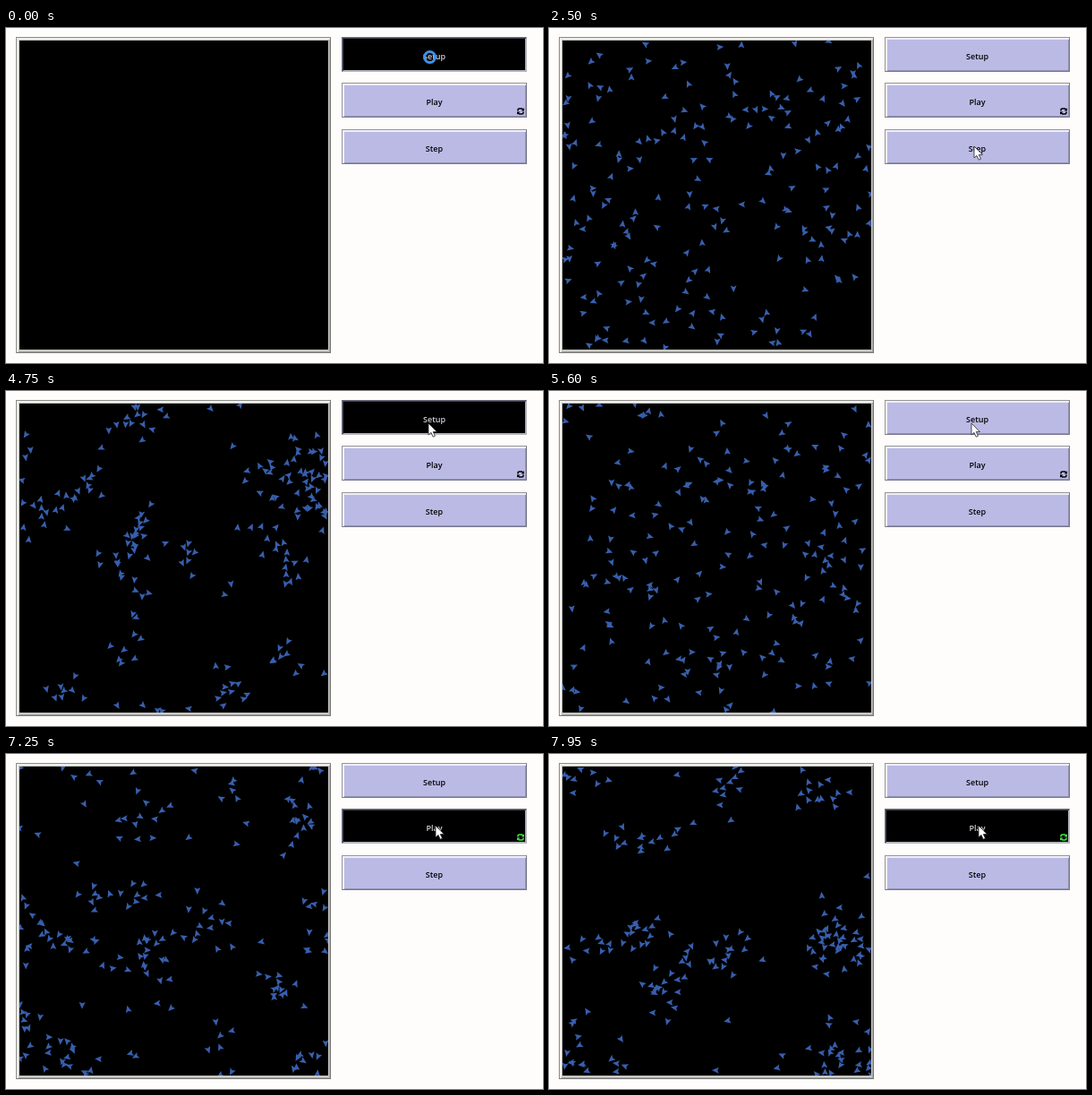
These frames come from a looping animation (600 px wide and 374 px high, 8 s). An HTML page with a canvas:

```html
<!DOCTYPE html>
<html lang="en">
<head>
<meta charset="utf-8">
<title>Flocking</title>
<style>
html, body { margin: 0; width: 100%; height: 100%; overflow: hidden; background: #fefdfc; }
body { position: relative; }
#frame, button, #cursor, #busy { position: absolute; box-sizing: border-box; }
#frame {
  left: 11px; top: 10px; width: 352px; height: 353px; background: #c9c9c5;
  border: 1px solid; border-color: #8c8c8a #777 #777 #8c8c8a;
  box-shadow: inset 2px 2px #eeeeea, inset -1px -1px #a5a5a2;
}
canvas { position: absolute; left: 3px; top: 3px; background: #000; }
button {
  left: 375px; width: 207px; height: 39px; padding: 3px 0 0; border-radius: 0;
  font: 600 9px/1 "Open Sans", "Noto Sans", sans-serif; color: #000;
  background: #bbbae5; border: 1px solid; border-color: #969696 #77778a #77778a #969696;
  box-shadow: inset 2px 2px #eeeef8, inset -1px -1px #9292b4;
}
button.down {
  background: #000; color: #d2d2dc; border-color: #6c6c80 #b4b4bc #b4b4bc #6c6c80;
  box-shadow: inset 1px 1px #444450, inset -1px -1px #b4b4bc;
}
#setup { top: 10px; }
#play { top: 61px; --icon: #000; }
#step { top: 113px; }
#play.down { --icon: #45e64c; }
#play svg { position: absolute; right: 2px; bottom: 2px; fill: none; stroke: var(--icon); stroke-width: 1.6; }
#play .tips { fill: var(--icon); stroke: none; }
#cursor { left: 0; top: 0; overflow: visible; }
#busy { left: 466px; top: 25px; width: 15px; height: 15px; border: 3px solid #3d91e6; border-radius: 50%; }
</style>
</head>
<body>
<div id="frame"><canvas id="board" width="345" height="345"></canvas></div>
<button id="setup">Setup</button>
<button id="play">Play
  <svg width="8" height="8" viewBox="0 0 8 8">
    <path d="M1 3.5V2.5Q1 1 2.5 1H5.5L7 2.5M7 4.5V5.5Q7 7 5.5 7H2.5L1 5.5"/>
    <path class="tips" d="M4.5 3.6H8V.2ZM3.5 4.4H0V7.8Z"/>
  </svg>
</button>
<button id="step">Step</button>
<div id="busy"></div>
<svg id="cursor" width="10" height="16"><path d="M0 0V13L3 10.4 5.2 15.2 7.5 14.2 5.3 9.6H9.4Z" fill="#fff" stroke="#222" stroke-width=".8"/></svg>
<script>
const LOOP = 8000, FRAME = 50, COUNT = 196, SIZE = 345, SPEED = 5;
const VISION = 34, GAP = 8, ALIGN_TURN = 0.2, COHERE_TURN = 0.28, AVOID_TURN = 0.25;
const el = id => document.getElementById(id);
const ctx = el("board").getContext("2d");
const wrap = v => ((v % SIZE) + SIZE) % SIZE;
const shortest = d => wrap(d + SIZE / 2) - SIZE / 2;
const clamp = (v, lo, hi) => Math.min(hi, Math.max(lo, v));

function randomizer(seed) {
  return () => {
    seed = (seed + 0x6D2B79F5) | 0;
    let r = Math.imul(seed ^ (seed >>> 15), 1 | seed);
    r = (r + Math.imul(r ^ (r >>> 7), 61 | r)) ^ r;
    return ((r ^ (r >>> 14)) >>> 0) / 4294967296;
  };
}

function scatter(seed) {
  const rnd = randomizer(seed);
  return Array.from({ length: COUNT }, () =>
    ({ x: rnd() * SIZE, y: rnd() * SIZE, heading: rnd() * 2 * Math.PI }));
}

const advance = ({ x, y, heading }, distance) => ({
  x: wrap(x + Math.sin(heading) * distance),
  y: wrap(y - Math.cos(heading) * distance),
  heading
});

// Angle from one heading to the direction (dx, dy), limited to a maximum turn
function turnTowards(heading, dx, dy, limit) {
  const diff = Math.atan2(dx, -dy) - heading;
  return clamp(Math.atan2(Math.sin(diff), Math.cos(diff)), -limit, limit);
}

// Each bird avoids a close neighbour, otherwise aligns with and approaches its flock
function flockTick(birds, course) {
  return birds.map(bird => {
    let { heading } = bird;
    let nearest = null, nearestDistance = VISION;
    let centreX = 0, centreY = 0, alignX = Math.sin(course), alignY = -Math.cos(course);
    for (const other of birds) {
      if (other === bird) continue;
      const dx = shortest(other.x - bird.x), dy = shortest(other.y - bird.y);
      const distance = Math.hypot(dx, dy);
      if (distance > VISION) continue;
      centreX += dx;
      centreY += dy;
      alignX += Math.sin(other.heading);
      alignY -= Math.cos(other.heading);
      if (distance < nearestDistance) {
        nearest = { dx, dy };
        nearestDistance = distance;
      }
    }
    if (nearestDistance < GAP) {
      heading += turnTowards(heading, -nearest.dx, -nearest.dy, AVOID_TURN);
    } else {
      heading += turnTowards(heading, alignX, alignY, ALIGN_TURN);
      if (nearest) heading += turnTowards(heading, centreX, centreY, COHERE_TURN);
    }
    return advance({ ...bird, heading }, SPEED);
  });
}

function makeScene(start, seed, ticks = 0, course = 0, tickAt = () => 0) {
  const history = [scatter(seed)];
  for (let i = 0; i < ticks; i++) history.push(flockTick(history[i], course));
  return { start, history, tickAt };
}

const stepTicks = t => clamp((t - 2500) / FRAME, 0, 21) + clamp((t - 3550) / FRAME, 0, 12) * 0.17;
const playTicks = t => Math.max(0, (t - 6850) / FRAME);

const scenes = [
  makeScene(50, 11),
  makeScene(800, 23, 24, 3.5, stepTicks),
  makeScene(4800, 37),
  makeScene(5150, 41),
  makeScene(5950, 59),
  makeScene(6550, 67, 23, 4.5, playTicks)
];

function drawBird({ x, y, heading }) {
  ctx.save();
  ctx.translate(x, y);
  ctx.rotate(heading);
  ctx.beginPath();
  ctx.moveTo(0, -4.6);
  ctx.lineTo(3.5, 3.2);
  ctx.lineTo(0, 1.8);
  ctx.lineTo(-3.5, 3.2);
  ctx.fill();
  ctx.restore();
}

function drawScene({ history, tickAt }, t) {
  const tick = tickAt(t), whole = Math.floor(tick);
  for (const bird of history[whole]) drawBird(advance(bird, (tick - whole) * SPEED));
}

const cursorPath = [
  [0, 473, 30], [1200, 473, 30], [1650, 475, 132], [4150, 475, 132], [4600, 472, 36],
  [5900, 472, 36], [6300, 478, 31], [6600, 478, 31], [6800, 480, 80], [LOOP, 480, 80]
];
function cursorAt(t) {
  const i = cursorPath.findIndex(k => k[0] > t);
  const [t0, x0, y0] = cursorPath[i - 1], [t1, x1, y1] = cursorPath[i];
  const u = (t - t0) / (t1 - t0), e = u * u * (3 - 2 * u);
  return [x0 + (x1 - x0) * e, y0 + (y1 - y0) * e];
}

// Setup is held for a moment before each new scene
const isSetupDown = t => scenes.some(s => t < s.start && t >= s.start - 100);
const isStepDown = t => t >= 2550 && t < 4000 && (t - 2550) % 400 < 200;

function render(t) {
  ctx.clearRect(0, 0, SIZE, SIZE);
  ctx.fillStyle = "#385fae";
  const scene = scenes.filter(s => s.start <= t).pop();
  if (scene) drawScene(scene, t);
  el("setup").classList.toggle("down", isSetupDown(t));
  el("play").classList.toggle("down", t >= 6850);
  el("step").classList.toggle("down", isStepDown(t));
  const busy = t < 100, [x, y] = cursorAt(t);
  el("busy").style.display = busy ? "" : "none";
  el("cursor").style.display = busy ? "none" : "";
  el("cursor").style.transform = `translate(${x}px, ${y}px)`;
}

const origin = performance.now();
function loop() {
  const t = (performance.now() - origin) % LOOP;
  render(Math.floor(t / FRAME) * FRAME);
  requestAnimationFrame(loop);
}
loop();
</script>
</body>
</html>
```
